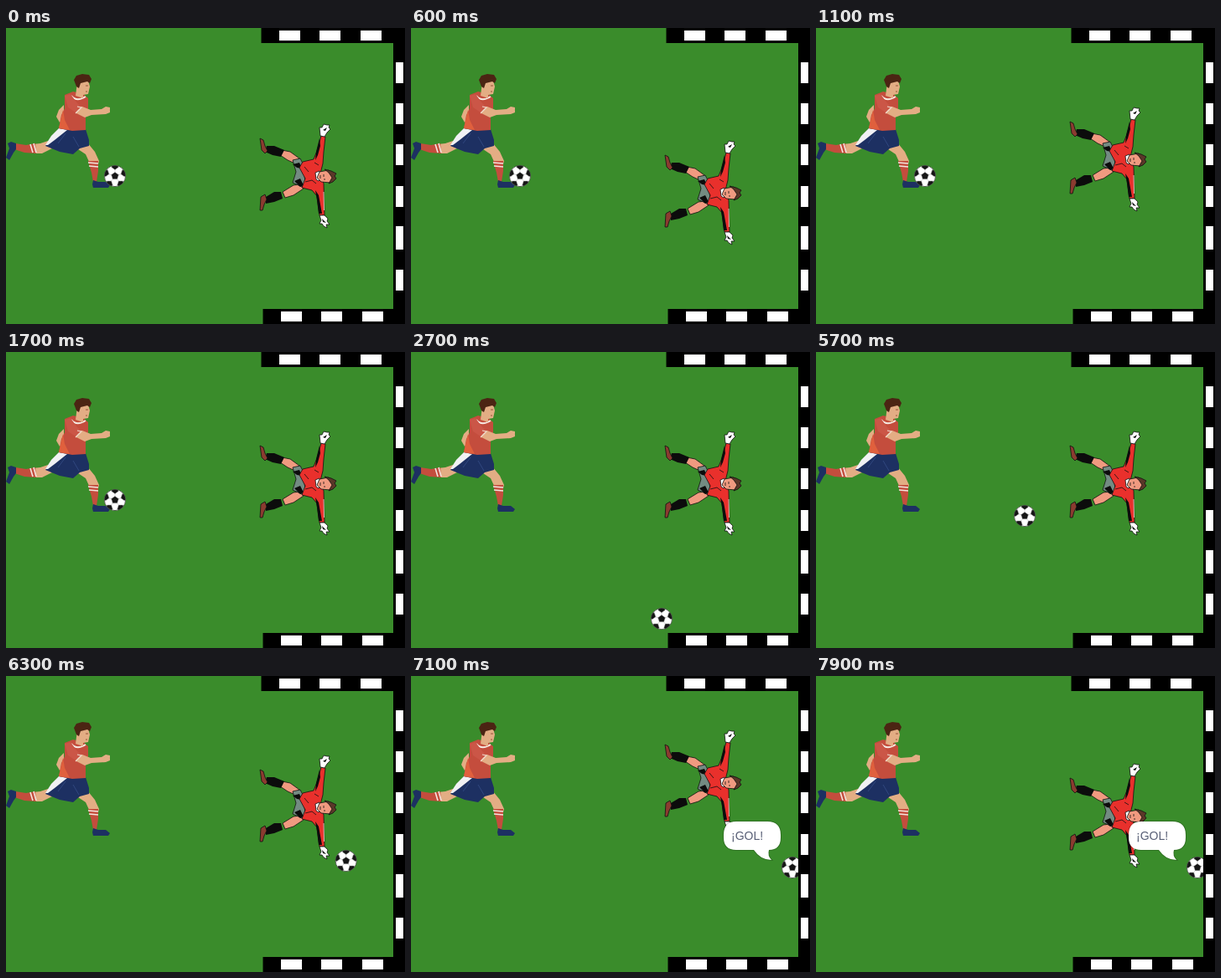
Recreate the animation shown at these times as an HTML page. Size 476x354 px, loop 8 s.

```html
<!DOCTYPE html>
<html lang="es">
<head>
<meta charset="utf-8">
<title>Tiro a puerta</title>
<style>
html, body { margin: 0; width: 100%; height: 100%; overflow: hidden; background: #3a8c2b; }
svg { display: block; width: 476px; height: 354px; }
text { font: 14px "Liberation Sans", Arial, sans-serif; fill: #575e75; }
.skin { fill: #e3ad84; }
.navy { fill: #1d3062; }
.red { fill: #c44d3d; }
.bubble path { fill: #fff; stroke: #000; stroke-opacity: .18; stroke-width: 2; paint-order: stroke; }
#keeper { stroke: #111; stroke-width: .8; stroke-linejoin: round; }
#keeper .kit { fill: #e9302c; }
#keeper .flesh { fill: #f09a80; }
#keeper .glove { fill: #fff; }
#keeper .boot { fill: #8b3b30; }
#keeper .dark { fill: #0c0c0c; stroke: none; }
</style>
</head>
<body>
<svg viewBox="0 0 476 354">
  <rect width="476" height="354" fill="#3a8c2b"/>

  <g id="player">
    <!-- back arm -->
    <path class="skin" d="M69 92L63 98L60 106L64 113L69 109Z"/>
    <!-- back leg -->
    <path class="skin" d="M50 135L41 138L32 139L34 150L43 150L55 144Z"/>
    <path class="red" d="M35 138L24 140L11 138L10 145L22 149L36 150Z"/>
    <path d="M29 139L32 149M33 138L36 149" stroke="#f3e5df" stroke-width="1.6"/>
    <path class="navy" d="M12 138L6 136L2 138L4 144L0 155L4 158L9 149L12 145Z"/>
    <!-- front leg -->
    <path class="skin" d="M80 141L97 137L106 148L111 159L110 163L100 162L95 151Z"/>
    <path class="red" d="M98 159L110 159L110 171L108 184L104 184L102 173Z"/>
    <path d="M98 161L110 162M99 165L110 166" stroke="#f3e5df" stroke-width="1.4"/>
    <path class="navy" d="M104 182L110 184L119 184L124 188L122 191L104 191L103 187Z"/>
    <!-- shorts -->
    <path class="navy" d="M64 119L95 121L99 134L99 141L88 144L80 151L64 148L47 141Z"/>
    <path d="M63 120L73 122L58 134L50 140L47 140L54 129Z" fill="#f1f1f4"/>
    <path d="M71 126L62 138M80 130L87 142" fill="none" stroke="#30477f"/>
    <!-- shirt -->
    <path class="red" d="M70 80L80 76L92 79L98 84L98 96L95 106L95 122L79 123L63 120L66 104L70 96Z"/>
    <path d="M68 98L63 120L76 122L70 110Z" fill="#e0603d"/>
    <path d="M78 81Q84 89 95 82" fill="none" stroke="#f6ebe5" stroke-width="2"/>
    <!-- head -->
    <path class="skin" d="M85 65L98 63L100 70L98 79L92 80L92 84L83 81Z"/>
    <path d="M84 70L81 62L84 57L91 55L99 56L102 61L100 66L97 64L89 66L87 72Z" fill="#4b2413"/>
    <path d="M95 69h3M95 76h2" stroke="#965437"/>
    <!-- front arm -->
    <path class="skin" d="M80 93L91 94L101 98L114 97L119 94L124 95L124 101L119 103L102 104L94 107L84 102Z"/>
    <path d="M70 81L77 79L85 90L90 94L83 101L74 95Z" fill="#cb5647"/>
    <path d="M85 94L90 95L83 102" fill="none" stroke="#f0dacd" stroke-width="1.2"/>
  </g>

  <g id="ball">
    <clipPath id="disc"><circle r="12.6"/></clipPath>
    <circle r="12.6" fill="#fff"/>
    <g id="patches" clip-path="url(#disc)" fill="#151515" stroke="#aaa" stroke-width=".5"></g>
    <circle r="12.6" fill="none" stroke="#333" stroke-width=".7"/>
  </g>

  <!-- drawn with the upper glove starting at y 0 -->
  <g id="keeper">
    <path class="flesh" d="M329 32L339 34L350 42L347 49L336 44L327 38Z"/>
    <path class="flesh" d="M352 73L343 74L330 82L333 89L343 86L355 78Z"/>
    <path class="dark" d="M311 27L320 27L332 32L328 40L318 38L309 34Z"/>
    <path class="dark" d="M310 88L320 82L328 82L330 90L320 94L310 96Z"/>
    <path class="boot" d="M303 18L307 20L309 27L312 33L309 36L305 32Z"/>
    <path class="boot" d="M304 88L309 85L311 91L308 97L306 104L303 104Z"/>
    <path d="M342 44L351 42L355 50L357 72L353 76L342 71L346 58Z" fill="#738b82"/>
    <path class="dark" d="M342 49L350 47L353 54L347 53ZM344 69L351 66L355 74L351 76Z"/>
    <!-- arms and shirt -->
    <path class="kit" d="M376 15L381 16L379 34L378 48L375 60L379 72L380 110L374 110L371 87L365 80L353 77L357 66L350 53L354 46L367 43L371 33Z"/>
    <path class="dark" d="M374 18L375 27L372 38L369 44L370 34ZM369 80L373 86L377 108L373 108L371 92Z"/>
    <path d="M356 52L361 58M357 70L365 68L370 72M368 47L373 50" fill="none"/>
    <path d="M379 82L379.500 104" stroke="#f4e7df" fill="none"/>
    <path class="glove" d="M374 5L377 5L379 1L383 2L386 2L385 5L387 7L383 11L380 16L375 15Z"/>
    <path class="glove" d="M374 110L380 110L384 114L383 117L386 121L382 121L383 125L379 123L377 120L374 120L376 116Z"/>
    <path class="dark" d="M378 8L383 5L381 9ZM377 114L382 119L378 118Z"/>
    <!-- head -->
    <path class="glove" d="M369 59L374 57L376 65L373 69L370 67Z"/>
    <path class="flesh" d="M374 58L385 56L391 63L387 71L376 70L371 65Z"/>
    <path d="M380 55L388 57L394 60L392 63L394 66L390 70L385 72L389 65L385 59Z" fill="#5a3728"/>
    <path d="M379 61v3M380 66v2M375 62v4" fill="none"/>
  </g>

  <g class="bubble" id="post">
    <path d="M227 269H281Q297 269 297 285V289Q297 305 282 305Q281 311 285 316Q272 316 264 305H227Q211 305 211 289V285Q211 269 227 269Z"/>
    <text x="221" y="292">¡AL PALO!</text>
  </g>
  <g class="bubble" id="goal">
    <path d="M388 174H425Q441 174 441 190V193Q441 208 427 208Q425 215 430 220Q417 220 409 208H388Q373 208 373 193V190Q373 174 388 174Z"/>
    <text x="382" y="196">¡GOL!</text>
  </g>

  <path d="M304.500 0H476V354H306.500V336H462V18H304.500Z"/>
  <g id="dashes" fill="#fff"></g>
</svg>
<script>
const $ = id => document.getElementById(id);
const LOOP = 8000, TICK = 100;

// Goal frame dashes: x, y, width, height
const dash = (x, y, w, h) => `<rect x="${x}" y="${y}" width="${w}" height="${h}"/>`;
$('dashes').innerHTML =
  [326, 374, 423].map(x => dash(x, 3, 25, 12) + dash(x + 2, 339, 25, 12)).join('') +
  [41, 90, 139, 189, 237, 289].map(y => dash(465, y, 9, y === 237 ? 28 : 25)).join('');

// One middle pentagon, five more around the rim, joined by seams
const polar = (r, a) => [r * Math.sin(a), -r * Math.cos(a)];
const fifths = [0, 1, 2, 3, 4].map(i => i * Math.PI * 2 / 5);
const pentagon = (cx, cy, r, turn) => '<polygon points="' + fifths.map(a => {
  const [x, y] = polar(r, a + turn);
  return `${cx + x},${cy + y}`;
}).join(' ') + '"/>';
$('patches').innerHTML = fifths.map(a => {
  const [x, y] = polar(11.8, a);
  return `<path d="M0 0L${x} ${y}"/>` + pentagon(x, y, 4.4, a + Math.PI);
}).join('') + pentagon(0, 0, 4.6, 0);

// Steps: time, then values
const keeperSteps = [
  [0, 114], [300, 64], [400, 64], [500, 104], [600, 134], [700, 154], [1300, 64],
  [1600, 64], [1700, 94], [6400, 94], [6800, 64], [7600, 64], [7700, 78], [7900, 104]
];
const ballSteps = [
  [0, 130, 177], [1740, 130, 177], [2740, 306, 325], [4799, 306, 325], [4800, 130, 177],
  [5300, 130, 177], [5400, 160, 182], [5700, 249, 196], [6200, 381, 217], [6500, 455, 229]
];

function valuesAt(steps, t) {
  const next = steps.findIndex(step => step[0] > t);
  if (next < 0) return steps[steps.length - 1].slice(1);
  const a = steps[next - 1], b = steps[next];
  const k = (t - a[0]) / (b[0] - a[0]);
  return a.slice(1).map((v, i) => v + (b[i + 1] - v) * k);
}

const show = (id, on) => $(id).setAttribute('visibility', on ? 'visible' : 'hidden');

function draw(now) {
  const t = Math.floor(now % LOOP / TICK) * TICK;
  const [keeperY] = valuesAt(keeperSteps, t);
  const [x, y] = valuesAt(ballSteps, t);
  $('keeper').setAttribute('transform', `translate(0 ${keeperY})`);
  $('ball').setAttribute('transform', `translate(${x} ${y})`);
  show('post', t >= 2800 && t < 4700);
  show('goal', t >= 6600);
}

const start = performance.now();
function frame() {
  draw(performance.now() - start);
  requestAnimationFrame(frame);
}
frame();
</script>
</body>
</html>
```
